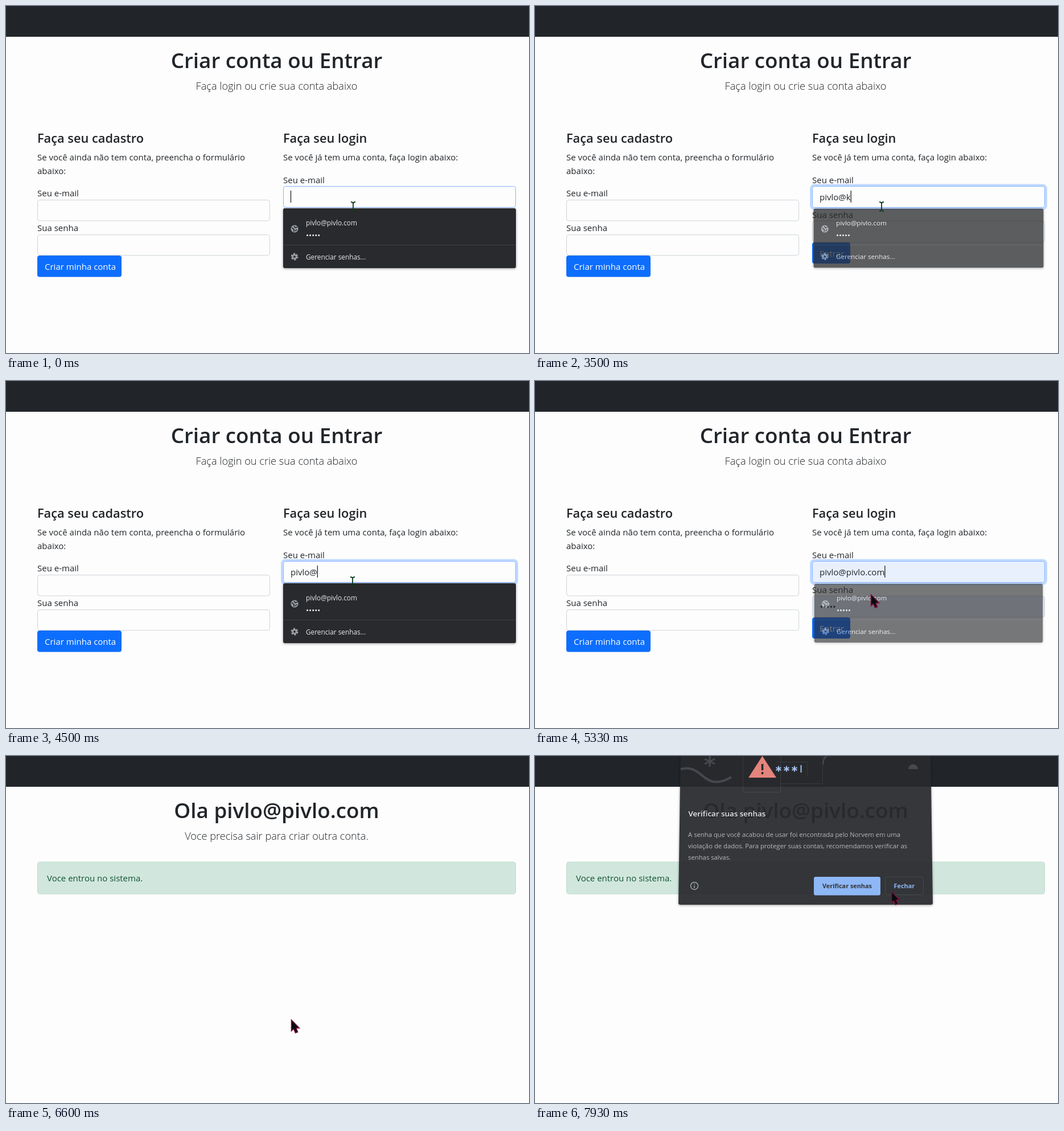
Write an HTML page that moves like this. It is 919x609 px and loops after 8 s.

```html
<!DOCTYPE html>
<html lang="pt">
<head>
<meta charset="utf-8">
<title>Criar conta ou Entrar</title>
<style>
  html, body { margin: 0; width: 100%; height: 100%; overflow: hidden; background: #fdfdfd; }
  svg { display: block; width: 919px; height: 609px; }
  text { font: 15px "Open Sans", "Noto Sans", sans-serif; fill: #212529; }
  .title { font-size: 36.8px; font-weight: 600; text-anchor: middle; }
  .lead { font-size: 18.2px; font-weight: 300; text-anchor: middle; }
  .head { font-size: 21.8px; font-weight: 600; }
  .field { fill: #fdfdfd; stroke: #ced4da; }
  .button { fill: #0d6efd; }
  .white { fill: #fff; }
  .menu text { font-size: 11.8px; fill: #e8eaed; }
  .dialog text { font-size: 11.3px; fill: #b4b7bb; }
  .dialog .name { font-size: 13.4px; font-weight: 600; fill: #e8eaed; }
  .dialog .action { font-size: 10.9px; font-weight: 700; text-anchor: middle; }
  .shadow { filter: drop-shadow(0 1px 2px #0006); }
</style>
</head>
<body>
<svg viewBox="0 0 919 609">
  <rect width="919" height="609" fill="#fdfdfd"/>
  <rect width="919" height="54" fill="#212529"/>

  <g id="formPage">
    <text class="title" x="475.5" y="109">Criar conta ou Entrar</text>
    <text class="lead" x="475.5" y="147">Faça login ou crie sua conta abaixo</text>

    <text class="head" x="55" y="240">Faça seu cadastro</text>
    <text x="55" y="271">Se você ainda não tem conta, preencha o formulário</text>
    <text x="55" y="295">abaixo:</text>
    <text x="55" y="334">Seu e-mail</text>
    <rect class="field" x="55.5" y="340.5" width="408" height="36.5" rx="4"/>
    <text x="55" y="395">Sua senha</text>
    <rect class="field" x="55.5" y="401.5" width="408" height="36" rx="4"/>
    <rect class="button" x="55" y="438" width="148" height="37.5" rx="4"/>
    <text class="white" x="68" y="463">Criar minha conta</text>

    <text class="head" x="487" y="240">Faça seu login</text>
    <text x="487" y="271">Se você já tem uma conta, faça login abaixo:</text>
    <text x="487" y="311">Seu e-mail</text>
    <rect id="emailRing" x="485" y="314.5" width="413" height="41.5" rx="6" fill="none" stroke="#0d6efd" stroke-opacity=".25" stroke-width="4"/>
    <rect id="email" class="field" x="487.5" y="316.5" width="408" height="37" rx="4"/>
    <text id="emailText" x="500" y="341"></text>
    <path id="caret" d="M0 324V345" stroke="#111" stroke-width="1.2"/>
    <text x="487" y="372">Sua senha</text>
    <rect id="password" class="field" x="487.5" y="377.5" width="408" height="37" rx="4"/>
    <text id="passwordText" x="500.5" y="402">•••••</text>
    <rect id="enterRing" x="485" y="413" width="71" height="41" rx="6" fill="none" stroke="#3184fd" stroke-opacity=".5" stroke-width="4"/>
    <rect id="enter" class="button" x="487" y="415" width="67" height="37" rx="4"/>
    <text class="white" x="500" y="440">Entrar</text>

    <g id="menu" class="menu">
      <rect class="shadow" x="487" y="355" width="409" height="105" rx="3" fill="#292a2d"/>
      <path id="hover" d="M487 358H896V419H487Z" fill="#3f4043"/>
      <path d="M487 419.5H896" stroke="#3c4043"/>
      <circle cx="507" cy="391" r="6.5" fill="#9aa0a6"/>
      <path d="M502 389l4 3v4M506 386l2 3 4-1M508 395l3-3" fill="none" stroke="#292a2d" stroke-width="1.7"/>
      <text class="mail" x="527" y="385"></text>
      <text x="527" y="407" style="font-size:13.5px">•••••</text>
      <circle cx="507" cy="440" r="5.2" fill="none" stroke="#9aa0a6" stroke-width="2.4" stroke-dasharray="3.2 2.245"/>
      <circle cx="507" cy="440" r="3.2" fill="none" stroke="#9aa0a6" stroke-width="2.6"/>
      <text x="527" y="444.5">Gerenciar senhas...</text>
    </g>
  </g>

  <g id="homePage">
    <text class="title" x="475.5" y="109">Ola <tspan class="mail"></tspan></text>
    <text class="lead" x="475.5" y="147">Voce precisa sair para criar outra conta.</text>
    <rect x="55.5" y="186" width="840" height="56" rx="4" fill="#d1e7dd" stroke="#badbcc"/>
    <text x="72" y="220" style="fill:#0f5132">Voce entrou no sistema.</text>

    <g id="dialog" class="dialog">
      <path id="panel" class="shadow" fill="#292a2d"/>
      <g fill="none" stroke="#484b50">
        <path d="M256 23C278 16 290 33 303 41S330 46 345 37" stroke-width="4"/>
        <path d="M307 0V19M298 5l18 9M316 5l-18 9" stroke-width="3"/>
        <path d="M365.5-5V63.5H431.5V-5M432 48.5H505.5V-5M424 10.5H478.5V36" stroke="#3a3d41"/>
        <path d="M506 15C506 6 509 3 514-2" stroke-width="2.5"/>
      </g>
      <path d="M656 23a8.5 8.5 0 0 1 17 0z" fill="#484b50"/>
      <path d="M399.5 0L424 38H375Z" fill="#f28b82"/>
      <path d="M399.5 14V25M399.5 28V32" stroke="#292a2d" stroke-width="3.5"/>
      <path id="stars" stroke="#aecbfa" stroke-width="2"/>
      <path d="M467.5 16V29" stroke="#aecbfa" stroke-width="2"/>

      <text class="name" x="269.5" y="106">Verificar suas senhas</text>
      <text x="269" y="142">A senha que você acabou de usar foi encontrada pelo Norvem em uma</text>
      <text x="269" y="162">violação de dados. Para proteger suas contas, recomendamos verificar as</text>
      <text x="269" y="182">senhas salvas.</text>
      <circle cx="280" cy="228" r="6.5" fill="none" stroke="#9aa0a6" stroke-width="1.5"/>
      <path d="M280 224V225.5M280 227V232" stroke="#9aa0a6" stroke-width="1.5"/>
      <rect x="490" y="212" width="117" height="32.5" rx="3" fill="#8ab4f8"/>
      <text class="action" x="548.5" y="232" style="fill:#292a2d">Verificar senhas</text>
      <rect x="615.5" y="212.5" width="67" height="31" rx="3" fill="none" stroke="#3c4043"/>
      <text class="action" x="649" y="232" style="fill:#8ab4f8">Fechar</text>
    </g>
  </g>

  <g id="cursor">
    <path id="beam" d="M-4-8Q0-8 0-5Q0-8 4-8M0-6V6M-4 8Q0 8 0 5Q0 8 4 8" fill="none" stroke="#0b3d1c" stroke-width="1.8"/>
    <path id="arrow" d="M.5 1V20.500L4.500 17 7.500 24 11.500 22.500 9 15.500H14.500Z" fill="#0a0a0a" stroke="#7a1040" stroke-width="1.5"/>
    <path id="hand" d="M-2 1Q0-1 2 1V9L11 11.500Q13 12 12.500 15L10 24H-1L-6 15Q-7 12-4 13L-2 15Z" fill="#0a0a0a" stroke="#7a1040" stroke-width="1.5"/>
  </g>
</svg>
<script>
const LOOP = 8000;
const MAIL = "pivlo@pivlo.com";
const el = {};
document.querySelectorAll("[id]").forEach(node => el[node.id] = node);
document.querySelectorAll(".mail").forEach(node => node.textContent = MAIL);
el.stars.setAttribute("d", [428, 442, 456].map(x =>
  `M${x} 17.5V27.5M${x - 4.5} 20l9 5M${x + 4.5} 20l-9 5`).join(""));

// Entries are [time, ...values].
const typed = [[0, ""], [1460, "p"], [1640, "pi"], [2390, "piv"], [2480, "pivl"], [2580, "pivlo"],
  [3220, "pivlo@"], [3430, "pivlo@k"], [3970, "pivlo@"], [4960, MAIL]];
const caretHidden = [[450, 1090], [2140, 2390], [3110, 3220], [4080, 4500], [4960, 5280], [5810, LOOP]];
const menuKeys = [[0, 1], [3430, 1], [3640, 0], [3970, 0], [4080, 1], [5280, 1], [5390, 0]];
const ringKeys = [[0, 0], [100, 1], [6040, 1], [6190, 0]];
const dialogKeys = [[6960, 0, 0.95], [7160, 1, 1.012], [7880, 1, 1.012], [7930, 0.94, 1], [8000, 0.75, 0.98]];
const cursorKeys = [[0, 610, 352, "beam"], [100, 609, 352, "beam"], [4620, 609, 352, "beam"],
  [4620, 905, 349, "arrow"], [4960, 905, 349, "arrow"], [4960, 760, 368, "arrow"], [5070, 590, 374, "arrow"],
  [5400, 590, 374, "arrow"], [5560, 560, 395, "beam"], [5700, 525, 425, "hand"], [5870, 512, 443, "hand"],
  [6150, 512, 443, "hand"], [6250, 506, 455, "arrow"], [6350, 501, 462, "arrow"],
  [7000, 501, 462, "arrow"], [7730, 626, 237, "arrow"]];

const latest = (keys, t) => keys.findLast(key => key[0] <= t) || keys[0];

function sample(keys, t, column = 1) {
  const from = latest(keys, t);
  const to = keys[keys.lastIndexOf(from) + 1];
  if (!to || t <= from[0]) return from[column];
  return from[column] + (to[column] - from[column]) * (t - from[0]) / (to[0] - from[0]);
}

const show = (node, visible) => node.style.display = visible ? "" : "none";
const scaleAbout = (x, y, s) => `translate(${x} ${y}) scale(${s}) translate(${-x} ${-y})`;

function drawForm(t) {
  const filled = t >= 5280;
  const ring = sample(ringKeys, t);
  el.emailText.textContent = latest(typed, t)[1];
  el.emailText.style.opacity = t >= 4960 && !filled ? 0.85 : 1;
  el.email.style.fill = t >= 4960 ? "#e8f0fe" : "";
  el.email.style.stroke = t < 6100 ? "#86b7fe" : "";
  el.emailRing.style.opacity = ring;
  el.caret.setAttribute("transform", `translate(${500.5 + el.emailText.getComputedTextLength()})`);
  show(el.caret, !caretHidden.some(([start, end]) => t >= start && t < end));

  el.password.style.fill = filled ? "#e8f0fe" : "";
  show(el.passwordText, filled);
  el.enter.style.fill = t >= 5700 ? "#0b5ed7" : "";
  el.enterRing.style.opacity = t >= 6040 ? 1 - ring : 0;

  const alpha = 1 - (1 - sample(menuKeys, t)) ** 1.3;
  el.menu.style.opacity = alpha;
  el.menu.setAttribute("transform", scaleAbout(691.5, 407.5, 1 - 0.05 * (1 - alpha)));
  show(el.hover, t >= 4960 && !filled);
}

function drawDialog(t) {
  const alpha = sample(dialogKeys, t, 1);
  const scale = sample(dialogKeys, t, 2);
  const inset = Math.min(4, 60 * (1 - alpha));
  el.dialog.style.opacity = alpha;
  el.dialog.setAttribute("transform", scaleAbout(475.5, 130, scale));
  el.panel.setAttribute("d",
    `M${252 + inset}-8H${699 - inset}L699 258Q699 261 696 261H255Q252 261 252 258Z`);
}

function draw() {
  const t = performance.now() % LOOP;
  const home = t >= 6600;
  show(el.formPage, !home);
  show(el.homePage, home);
  if (home) drawDialog(t); else drawForm(t);

  const shape = latest(cursorKeys, t)[3];
  el.cursor.setAttribute("transform", `translate(${sample(cursorKeys, t, 1)} ${sample(cursorKeys, t, 2)})`);
  for (const name of ["beam", "arrow", "hand"]) show(el[name], name === shape);
  requestAnimationFrame(draw);
}
draw();
</script>
</body>
</html>
```
